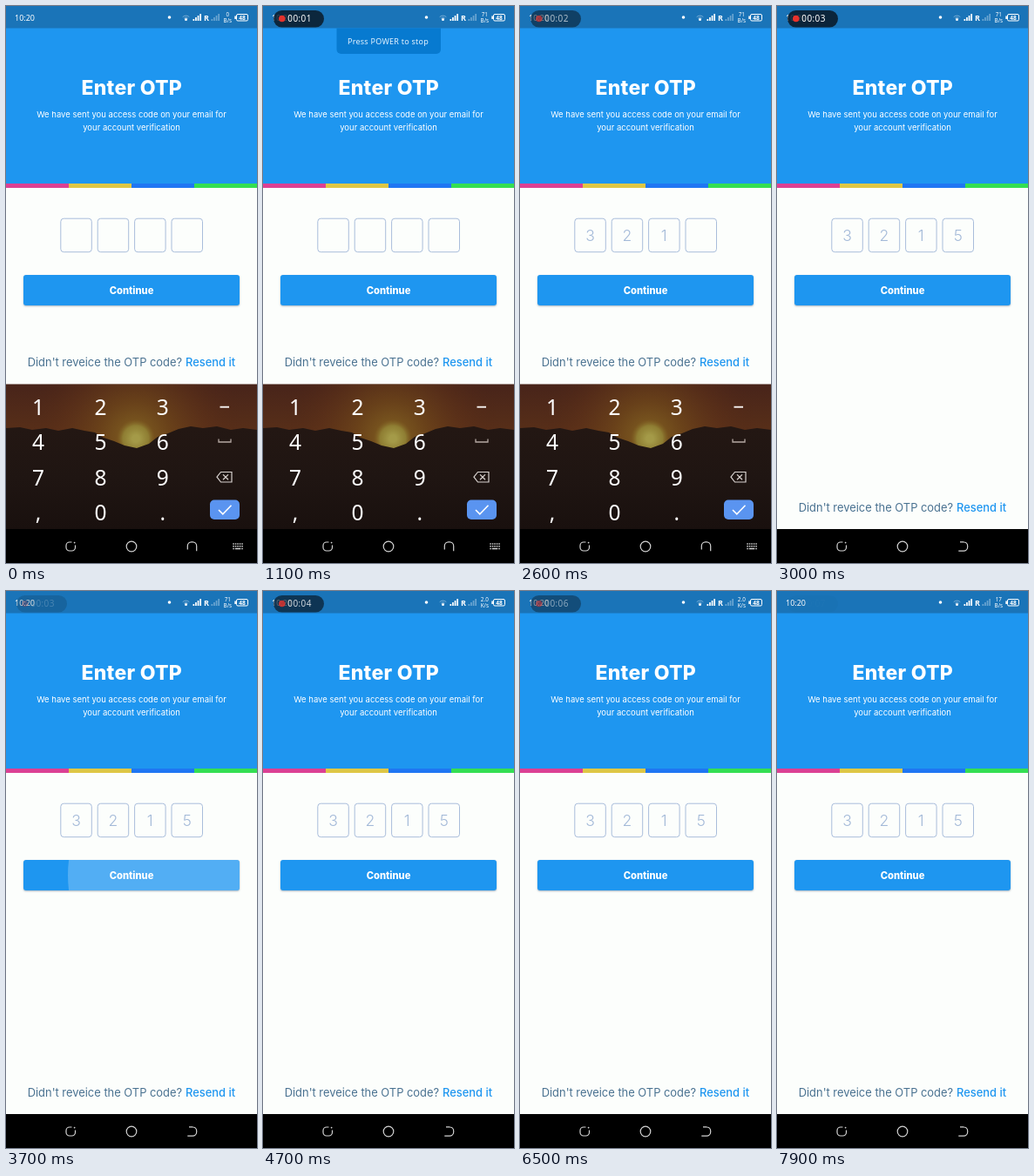
Write an HTML page with a canvas that moves like this. It is 288 by 640 pixels and loops after 8 s.

```html
<!DOCTYPE html>
<html lang="en">
<head>
<meta charset="utf-8">
<title>Enter OTP</title>
<style>
  html, body { margin: 0; width: 100%; height: 100%; overflow: hidden; background: #000; }
  canvas { display: block; width: 288px; height: 640px; }
</style>
</head>
<body>
<canvas id="stage"></canvas>
<script>
const W = 288, H = 640, LOOP = 8000, STEP = 100;
const BLUE = '#1e96f0';
const UI = 'Inter, sans-serif';
const SYS = '"Noto Sans", sans-serif';

const canvas = document.getElementById('stage');
const ratio = window.devicePixelRatio || 1;
canvas.width = W * ratio;
canvas.height = H * ratio;
const c = canvas.getContext('2d');
c.scale(ratio, ratio);

const clamp = v => Math.max(0, Math.min(1, v));
const ramp = (t, from, to) => clamp((t - from) / (to - from));

function text(str, x, y, font, color, align = 'left', gap = 0) {
  c.font = font;
  c.fillStyle = color;
  c.textAlign = align;
  c.letterSpacing = gap + 'px';
  c.fillText(str, x, y);
}

function rect(x, y, w, h, color) {
  c.fillStyle = color;
  c.fillRect(x, y, w, h);
}

function roundPath(x, y, w, h, r) {
  c.beginPath();
  c.roundRect(x, y, w, h, r);
}

function roundFill(x, y, w, h, r, color) {
  roundPath(x, y, w, h, r);
  c.fillStyle = color;
  c.fill();
}

function disc(x, y, r, color) {
  c.beginPath();
  c.arc(x, y, r, 0, Math.PI * 2);
  c.fillStyle = color;
  c.fill();
}

function line(points, color, width = 1, close = false) {
  c.beginPath();
  points.forEach(([x, y]) => c.lineTo(x, y));
  if (close) c.closePath();
  c.strokeStyle = color;
  c.lineWidth = width;
  c.stroke();
}

function layer(alpha, draw) {
  if (alpha <= 0) return;
  c.save();
  c.globalAlpha = alpha;
  draw();
  c.restore();
}

function signal(x, color) {
  for (let i = 0; i < 4; i++) {
    const h = 2 + i * 2;
    rect(x + i * 2.6, 17 - h, 1.7, h, color);
  }
}

function statusBar(t) {
  rect(0, 0, W, 25.5, '#1a74b8');
  text('10:20', 10, 17, '9px ' + SYS, '#fff');
  disc(187.5, 13, 1.8, '#fff');

  c.strokeStyle = 'rgba(255,255,255,.4)';
  c.lineWidth = 1;
  for (const r of [3.2, 5.4]) {
    c.beginPath();
    c.arc(206.5, 16.5, r, -Math.PI * .75, -Math.PI * .25);
    c.stroke();
  }
  disc(206.5, 15.6, 1.5, '#fff');

  signal(214.5, '#fff');
  text('R', 227, 17, 'bold 9px ' + SYS, '#fff');
  signal(235.5, 'rgba(255,255,255,.35)');

  const [num, unit] = t < 900 ? ['0', 'B/s'] : t < 3900 ? ['71', 'B/s']
    : t < 6900 ? ['2.0', 'K/s'] : ['17', 'B/s'];
  text(num, 254.3, 12, '6.3px ' + SYS, '#fff', 'center');
  text(unit, 254.3, 19, '6.3px ' + SYS, '#fff', 'center');

  roundPath(264.5, 9.5, 13, 7.5, 1.5);
  c.strokeStyle = '#fff';
  c.lineWidth = 1;
  c.stroke();
  rect(262.3, 11.5, 1.6, 3.5, '#fff');
  text('48', 271, 15.8, 'bold 6.5px ' + SYS, '#fff', 'center');
}

// The recording pill breathes once every two seconds.
function recordPill(t) {
  layer(Math.sin(Math.PI * t / 2000) ** 2, () => {
    roundFill(12, 5, 58, 19.5, 9.7, 'rgba(8,18,28,.8)');
    disc(21.8, 14.5, 3.8, '#e8322c');
    text('00:0' + Math.floor(t / 1000), 28.3, 18, '10px ' + SYS, '#fff', 'left', .4);
  });
}

function toast(t) {
  layer(ramp(t, 100, 500) * (1 - ramp(t, 1900, 2300)), () => {
    roundFill(84.5, 25.5, 119.5, 29.5, [0, 0, 5, 5], '#077ad0');
    text('Press POWER to stop', 97, 44, '9px ' + SYS, '#e6f4ff', 'left', .25);
  });
}

function header() {
  rect(0, 0, W, 206, BLUE);
  text('Enter OTP', 144.2, 102, '800 23px ' + UI, '#fff', 'center', .25);
  text('We have sent you access code on your email for', 144, 128, '9.5px ' + UI, '#fff', 'center');
  text('your account verification', 144, 143.3, '9.5px ' + UI, '#fff', 'center');
  ['#dc4093', '#dfc744', '#1f76f3', '#35df52'].forEach((col, i) => rect(i * 72, 204, 72, 5, col));
}

function codeBoxes(t) {
  const typed = [[1500, '3'], [1900, '2'], [2300, '1'], [2700, '5']];
  typed.forEach(([at, digit], i) => {
    const x = 62.8 + i * 42.4;
    roundPath(x, 244.2, 35.5, 38.5, 3.5);
    c.strokeStyle = '#a9bddb';
    c.lineWidth = 1;
    c.stroke();
    if (t >= at) text(digit, x + 17.7, 270, '300 17.5px ' + UI, '#a3b9d8', 'center');
  });
}

function button(t) {
  c.save();
  c.shadowColor = 'rgba(0,40,80,.35)';
  c.shadowBlur = 2 * ratio;
  c.shadowOffsetY = 1 * ratio;
  roundFill(20, 309, 248, 35, 3, BLUE);
  c.restore();

  layer(t < 3400 ? 0 : 1 - ramp(t, 3800, 4200), () => {
    roundPath(20, 309, 248, 35, 3);
    c.clip();
    disc(215, 326.5, ramp(t, 3400, 3850) * 216, 'rgba(255,255,255,.23)');
  });
  text('Continue', 144, 330.6, '800 11.2px ' + UI, '#fff', 'center');
}

function resend(y) {
  text("Didn't reveice the OTP code?", 24.7, y, '12.9px ' + UI, '#4a7291');
  text('Resend it', 206, y, '500 12.9px ' + UI, BLUE);
}

function sunset() {
  c.save();
  c.beginPath();
  c.rect(0, 434.5, W, 167);
  c.clip();

  const sky = c.createLinearGradient(0, 434, 0, 505);
  sky.addColorStop(0, '#48241a');
  sky.addColorStop(1, '#5c3218');
  rect(0, 434, W, 167, sky);

  const glow = c.createRadialGradient(148, 494, 4, 148, 494, 125);
  glow.addColorStop(0, 'rgba(132,100,34,.9)');
  glow.addColorStop(.3, 'rgba(112,72,26,.75)');
  glow.addColorStop(.65, 'rgba(98,52,24,.4)');
  glow.addColorStop(1, 'rgba(80,38,22,0)');
  rect(0, 434, W, 167, glow);

  const sun = c.createRadialGradient(149, 497, 4, 149, 497, 22);
  sun.addColorStop(0, '#a49a48');
  sun.addColorStop(.6, 'rgba(146,132,54,.85)');
  sun.addColorStop(1, 'rgba(130,100,36,0)');
  rect(120, 470, 60, 50, sun);

  const ridge = [[0, 485], [16, 484], [30, 487], [46, 485], [60, 488], [76, 485], [90, 488],
    [102, 490], [112, 496], [124, 500], [136, 505], [150, 508], [164, 503], [174, 495],
    [186, 491], [198, 486], [212, 483], [226, 485], [242, 483], [258, 487], [272, 485], [288, 487]];
  c.beginPath();
  c.moveTo(0, 602);
  ridge.forEach(([x, y]) => c.lineTo(x, y));
  c.lineTo(W, 602);
  const rock = c.createLinearGradient(0, 486, 0, 601);
  rock.addColorStop(0, '#231713');
  rock.addColorStop(.5, '#1f1512');
  rock.addColorStop(1, '#19100e');
  c.fillStyle = rock;
  c.fill();
  c.restore();
}

function keyboard() {
  sunset();
  ['123', '456', '789', ',0.'].forEach((row, r) =>
    [...row].forEach((key, i) =>
      text(key, 37 + i * 71.4, 469.5 + r * 40.5, '24.5px ' + SYS, '#fff', 'center')));

  rect(245.5, 459.8, 10.5, 1.9, '#f4f0ee');
  line([[244, 497.5], [244, 501], [258, 501], [258, 497.5]], '#b5a9a4', 1.3);
  line([[242, 541.2], [246.5, 535.5], [259, 535.5], [259, 547], [246.5, 547]], '#d8d2cf', 1.2, true);
  line([[249, 538.4], [255, 544.2]], '#d8d2cf', 1.3);
  line([[255, 538.4], [249, 544.2]], '#d8d2cf', 1.3);
  roundFill(234, 567.5, 34, 22.5, 5, '#5a94f0');
  line([[244, 579], [248.8, 583.8], [258.5, 573.8]], '#fff', 1.6);
}

function navBar(open) {
  const tint = '#d4d4d4';
  rect(0, 601, W, 39, '#000');
  c.strokeStyle = tint;
  c.lineWidth = 1.2;

  c.beginPath();
  c.moveTo(75.5, 616);
  c.lineTo(73, 616);
  c.arcTo(69, 616, 69, 620, 4);
  c.arcTo(69, 626, 73, 626, 4);
  c.arcTo(79.5, 626, 79.5, 622, 4);
  c.lineTo(79.5, 619.5);
  c.stroke();
  disc(78.6, 616.6, .9, tint);

  c.beginPath();
  c.arc(144, 621, 5.8, 0, Math.PI * 2);
  c.stroke();

  c.save();
  c.translate(213.5, 621);
  if (open) c.rotate(-Math.PI / 2);
  c.beginPath();
  c.moveTo(-3.5, -5.2);
  c.lineTo(1, -5.2);
  c.arcTo(5.2, -5.2, 5.2, 0, 4.6);
  c.arcTo(5.2, 5.2, 0, 5.2, 4.6);
  c.lineTo(-5.2, 5.2);
  c.stroke();
  c.restore();

  if (!open) return;
  for (let r = 0; r < 2; r++)
    for (let i = 0; i < 5; i++) rect(260.3 + i * 2.5, 617.3 + r * 2.7, 1.5, 1.5, tint);
  rect(260.3, 622.8, 1.5, 1.5, tint);
  rect(262.8, 622.8, 6.5, 1.5, tint);
  rect(270.3, 622.8, 1.5, 1.5, tint);
}

function draw(t) {
  const open = t < 2700;
  rect(0, 0, W, H, '#fcfefc');
  header();
  statusBar(t);
  toast(t);
  recordPill(t);
  codeBoxes(t);
  button(t);
  resend(t < 2800 ? 414 : 581.3);
  if (open) keyboard();
  navBar(open);
}

const start = performance.now();
function tick(now) {
  const t = Math.max(0, now - start) % LOOP;
  draw(Math.floor(t / STEP) * STEP);
  requestAnimationFrame(tick);
}
draw(0);
requestAnimationFrame(tick);
</script>
</body>
</html>
```
